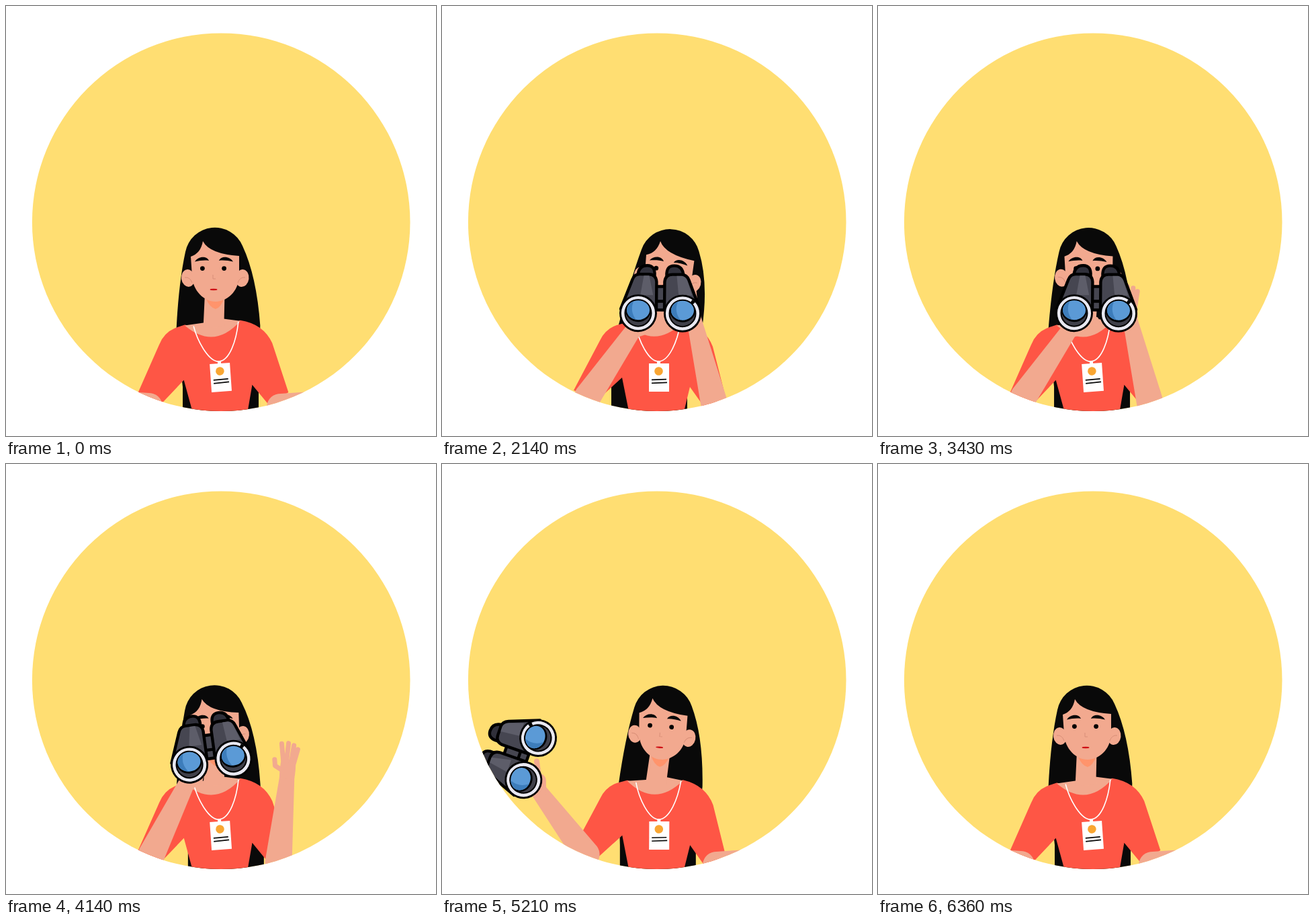
Recreate the animation shown at these times as an HTML page. Size 640 px wide and 640 px high, loop 6.43 s.

```html
<!DOCTYPE html>
<html lang="en">
<head>
<meta charset="utf-8">
<title>Looking around</title>
<style>
  html, body { margin: 0; width: 100%; height: 100%; overflow: hidden; background: #fff; }
  svg { display: block; width: 100vw; height: 100vh; }
</style>
</head>
<body>
<svg viewBox="0 0 640 640">
  <defs>
    <clipPath id="disc"><circle cx="320.2" cy="321.7" r="281.3"/></clipPath>
    <g id="barrel" stroke="#000" stroke-width="4.4" stroke-linejoin="round">
      <path d="M9 -56Q8 -71 20 -71Q33 -71 34 -56Z" fill="#30303a"/>
      <path d="M6 -6V-47Q7 -58 18 -58H31Q39 -58 42 -50L59 -6Z" fill="#464651"/>
    </g>
    <g id="lens">
      <circle r="28"/>
      <circle r="22.8" fill="none" stroke="#e9e9f2" stroke-width="4.6"/>
      <circle r="18.5" fill="#40404a"/>
      <ellipse cy="-4" rx="19" ry="17"/>
      <ellipse cy="-4.5" rx="17" ry="14.5" fill="#5b9ad6"/>
      <path d="M-7 -17.7A17 14.5 0 0 0 -3 9.8Q-13 -3 -7 -17.7Z" fill="#3d7dbb"/>
    </g>
  </defs>
  <g clip-path="url(#disc)">
    <rect width="640" height="640" fill="#ffde72"/>
    <path id="hair" fill="#090909"/>
    <g id="torso">
      <path fill="#fe5645" d="M275 471L260 475Q243 481 235 498L196 572L232 586L268 553L279 608H359L369 567L391 598L422 582L403 507Q392 478 358 470L333 478H303Z"/>
      <path fill="#f2a98f" d="M275 472Q316 512 358 471L333 466L303 470Z"/>
    </g>
    <path id="neck" fill="#f2a98f"/>
    <g id="badge">
      <path d="M288 474C293 500 308 529 322 529C338 529 350 500 355 472" fill="none" stroke="#fff" stroke-width="1.6"/>
      <path d="M320 528h5v5h-5zM308 532h30v42h-30z" fill="#fff"/>
      <circle cx="322.5" cy="543.5" r="6.3" fill="#f9a632"/>
      <path d="M312 556.3L334 555.7M312 561.3L335 560.3" stroke="#090909" stroke-width="1.7"/>
    </g>
    <g id="head">
      <path d="M297 434Q303 449 312 451Q320 449 325 434Z" fill="#ff946c"/>
      <g fill="#f2a98f">
        <ellipse cx="271" cy="405" rx="10" ry="13" transform="rotate(-8 271 405)"/>
        <ellipse cx="351.5" cy="405" rx="10" ry="13" transform="rotate(8 351 405)"/>
        <path d="M275 373Q290 368 293 350Q303 369 347 372V402C346 426 328 440 312 440C295 440 278 424 277 402Z"/>
      </g>
      <path d="M266 404Q274 403 277 412M356 404Q348 403 345 412M308 400V406H312" fill="none" stroke="#d98f78" stroke-width="1"/>
      <path d="M281 380.5C286 372 299 371.5 302 379C296 378 288 379 281 380.5ZM317 379C320 371.5 333 372 338 380.5C331 379 323 378 317 379Z" fill="#090909"/>
      <circle cx="292.4" cy="390.6" r="3.4"/>
      <circle cx="324.6" cy="390.6" r="3.4"/>
      <ellipse id="mouth" cx="309" rx="5.5" fill="#cf1015"/>
    </g>
    <g id="armR" fill="#f2a98f">
      <path d="M-20 0L-11 -128H11L20 0A20 20 0 0 1 -20 0Z"/>
      <g id="handR">
        <path d="M-11 4Q-13 -12 -12 -24L9 -26Q12 -10 11 4Z"/>
        <path d="M-9 -8L-20 -13L-22 -22M-9 -22L-15 -47M-4 -22L-5 -49M3 -22L3.5 -47M7 -20L10 -42" fill="none" stroke="#f2a98f" stroke-width="7" stroke-linecap="round" stroke-linejoin="round"/>
      </g>
    </g>
    <g id="armL" fill="#f2a98f">
      <path d="M-20 0L-12 -120H12L20 0A20 20 0 0 1 -20 0Z"/>
      <path d="M0 -118L9 -130" stroke="#f2a98f" stroke-width="22" stroke-linecap="round"/>
      <path d="M8 -126L24 -155" stroke="#f2a98f" stroke-width="8" stroke-linecap="round"/>
    </g>
    <g id="bino">
      <path d="M-7 -40H7V-5H-7ZM-7 -18H7" fill="#464651" stroke="#000" stroke-width="4.4"/>
      <use href="#barrel"/>
      <use href="#barrel" transform="scale(-1 1)"/>
      <path d="M-25 -56H-17L-11 -27H-30ZM24 -56H32Q37 -55 40 -48L47 -27H27Z" fill="#5d5d69"/>
      <use href="#lens" x="-33"/>
      <use href="#lens" x="33"/>
      <path d="M46 -18.7A23 23 0 0 1 50 -15.3" fill="none" stroke="#000" stroke-width="5"/>
    </g>
  </g>
</svg>
<script>
  const LOOP = 6430, FRAMES = 90, STEP = LOOP / FRAMES;
  const $ = id => document.getElementById(id);

  function ease(t, from, to) {
    const u = Math.min(1, Math.max(0, (t - from) / (to - from)));
    return u * u * (3 - 2 * u);
  }

  // Rises from 0 to 1 between a and b, falls back between c and d.
  const pulse = (t, a, b, c, d) => ease(t, a, b) - ease(t, c, d);

  function turn(x, y, deg, cx = 0, cy = 0) {
    const r = deg * Math.PI / 180, c = Math.cos(r), s = Math.sin(r);
    return [cx + (x - cx) * c - (y - cy) * s, cy + (x - cx) * s + (y - cy) * c];
  }

  const place = (id, x, y, deg, k = 1) =>
    $(id).setAttribute('transform', `translate(${x} ${y}) rotate(${deg}) scale(${k})`);

  function drawBody(t) {
    const look = pulse(t, 700, 2100, 2200, 3700);
    const glance = pulse(t, 4500, 5210, 5300, 6300);
    const wave = pulse(t, 300, 1140, 1200, 1700) + pulse(t, 3700, 4500, 4600, 5400);
    const talk = pulse(t, 500, 1000, 4300, 4900);

    const lean = 4 * pulse(t, 0, 1000, 2200, 3400) + 4.3 * pulse(t, 4050, 5200, 5300, 6300) - 4;
    const sway = 13.5 * wave - 11 * look;
    const tilt = 8 * look + 5 * glance - 3.5 * wave;
    const dx = 26 * look + 17 * glance, dy = 2 * look - wave;

    const body = (x, y) => turn(x, y, lean, 320, 602);
    const head = (x, y) => {
      const [a, b] = turn(x, y, tilt, 310, 392);
      return [a + dx, b + dy];
    };

    for (const id of ['torso', 'badge'])
      $(id).setAttribute('transform', `rotate(${lean} 320 602)`);
    $('head').setAttribute('transform', `translate(${dx} ${dy}) rotate(${tilt} 310 392)`);
    $('mouth').setAttribute('ry', 1.2 + 5.6 * talk);
    $('mouth').setAttribute('cy', 422 - 2.8 * talk);

    $('neck').setAttribute('d',
      `M${head(296, 428)}L${head(325.5, 428)}L${body(334, 468)}L${body(334, 478)}L${body(303, 478)}L${body(303, 471)}Z`);
    $('hair').setAttribute('d',
      `M${263 + sway} 606V567L${body(262, 478)}Q${head(257, 412)} ${head(267, 366)}`
      + `A44.7 44.7 0 0 1 ${head(352, 357)}Q${head(373, 402)} ${body(387, 480)}L${376 + sway} 567V606Z`);
  }

  function drawArms(t) {
    const raiseR = pulse(t, 580, 1600, 3700, 5240);
    const scaleDip = pulse(t, 0, 700, 1140, 1500);
    place('armR', 408 - 3 * raiseR, 597 - 6 * raiseR, 82 - 95.5 * raiseR, 1 - .1 * scaleDip);
    place('handR', 0, -128, 15 * pulse(t, 2400, 3400, 3450, 4400));

    const raiseL = pulse(t, 350, 1600, 3720, 6320);
    const x = 213 + 4 * raiseL, y = 596 - 15 * pulse(t, 0, 700, 5250, 6200);
    const angle = 116.5 * raiseL - 82, k = 1 - .16 * scaleDip;
    place('armL', x, y, angle, k);

    // The binoculars ride on the left hand.
    const [gx, gy] = turn(19 - 15 * scaleDip, -43 + 22 * scaleDip - 120 * k, angle);
    place('bino', x + gx, y + gy, angle - 34 + 19 * scaleDip, 1 - .26 * scaleDip);
  }

  const start = performance.now();
  function tick() {
    const t = (performance.now() - start) % LOOP;
    const now = Math.floor((t + 6) / STEP) % FRAMES * STEP;
    drawBody(now);
    drawArms(now);
    requestAnimationFrame(tick);
  }
  tick();
</script>
</body>
</html>
```
